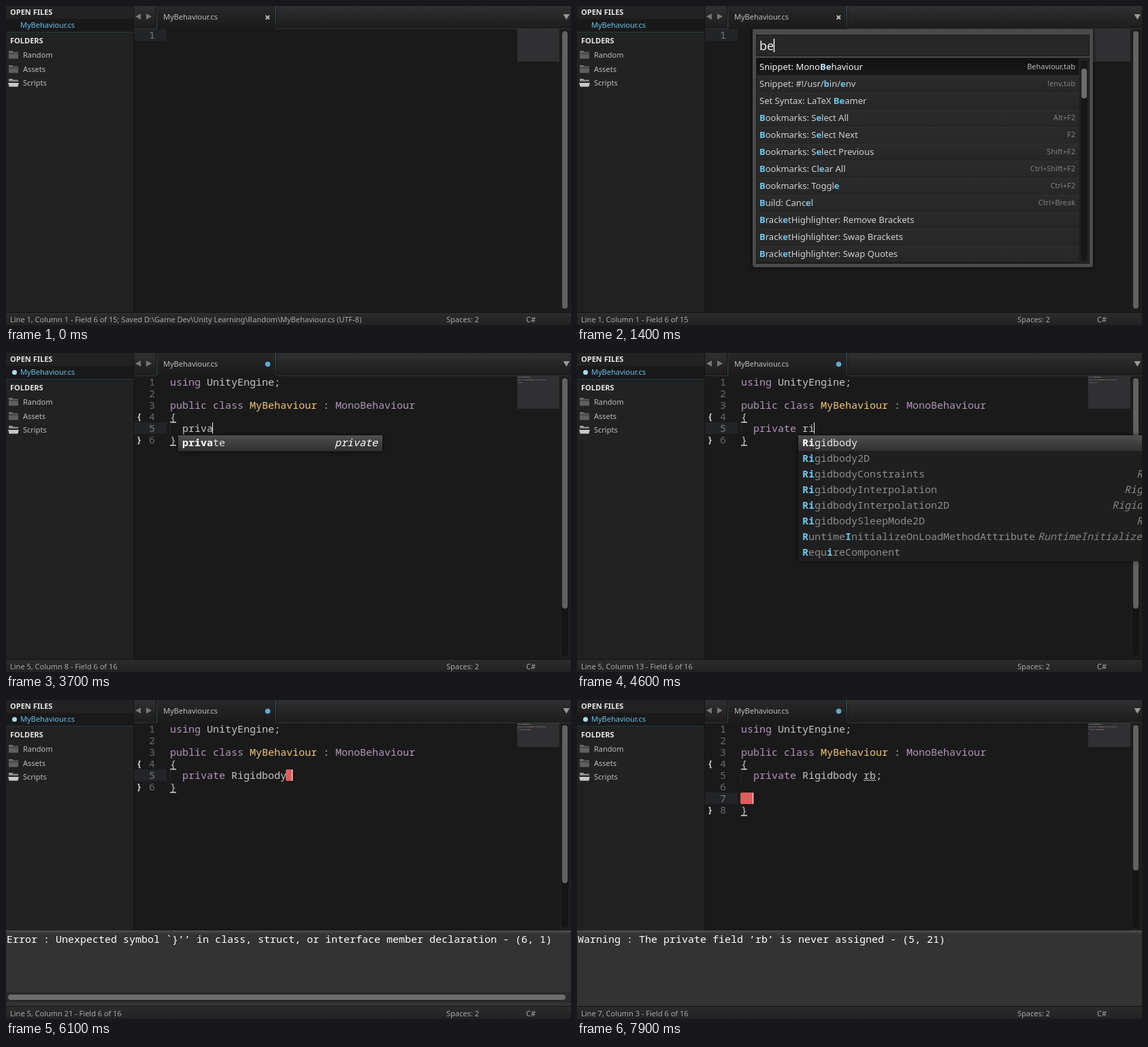
These frames come from a looping animation (830x469 px, 8 s). An HTML page with a canvas:

```html
<!DOCTYPE html>
<html lang="en">
<head>
<meta charset="utf-8">
<title>Editor</title>
<style>
html, body { margin: 0; width: 100%; height: 100%; overflow: hidden; background: #1a1a1a; }
canvas { display: block; }
</style>
</head>
<body>
<canvas id="stage" width="830" height="469"></canvas>
<script>
const g = document.getElementById('stage').getContext('2d');
const LOOP = 8000, ROW = 17, CH = 9, CODE_X = 241, TOP = 34;
const MONO = '"Noto Sans Mono", "DejaVu Sans Mono", monospace';
const SANS = '"Noto Sans", "Open Sans", sans-serif';
const UI = `11px ${SANS}`, CODE = `15px ${MONO}`;
const PURPLE = '#b294bb', YELLOW = '#f0c674', PLAIN = '#c5c8c6', BLUE = '#6cc8f2';

// Text of the line being typed, with the completion query it opens
const typing = [
  [2000, '  '], [3300, '  p'], [3500, '  pri', 'pri'], [3600, '  priv', 'priv'],
  [3700, '  priva', 'priva'], [3800, '  privat', 'privat'], [3900, '  private', 'private'],
  [4000, '  private '], [4400, '  private r', 'r'], [4500, '  private ri', 'ri'],
  [5800, '  private Rigidbody'], [6100, '  private Rigidbody '],
  [6400, '  private Rigidbody r', 'r'], [6700, '  private Rigidbody rb', 'rb'],
  [6900, '  private Rigidbody rb;']
];
const queries = [[0, ''], [1300, 'b'], [1400, 'be'], [1500, 'beh'], [1700, 'beha']];
const blink = [[0, 0], [300, .5], [400, 1], [700, 0], [2000, 1], [2600, .5], [2700, 0], [2900, 1],
  [4900, .5], [5000, 0], [5500, .5], [5600, 1], [7200, 0], [7400, 1]];

const commands = [
  ['Snippet: MonoBehaviour', 'Behaviour,tab'], ['Snippet: #!/usr/bin/env', '!env,tab'],
  ['Set Syntax: LaTeX Beamer'], ['Bookmarks: Select All', 'Alt+F2'], ['Bookmarks: Select Next', 'F2'],
  ['Bookmarks: Select Previous', 'Shift+F2'], ['Bookmarks: Clear All', 'Ctrl+Shift+F2'],
  ['Bookmarks: Toggle', 'Ctrl+F2'], ['Build: Cancel', 'Ctrl+Break'],
  ...['Remove Brackets', 'Swap Brackets', 'Swap Quotes', 'Select Tag Name', 'Select Tag Attributes',
    'Select Bracket Content', 'Fold Bracket Content', 'Jump to Left Bracket', 'Jump to Right Bracket',
    'Show Bracket Debug Info', 'Toggle Global Enable', 'Toggle High Visibility Mode'
  ].map(s => ['BracketHighlighter: ' + s])
];
const rigid = ['', '2D', 'Constraints', 'Interpolation', 'Interpolation2D', 'SleepMode2D'].map(s => 'Rigidbody' + s);

const at = (list, t) => list.filter(e => e[0] <= t).pop();
const clamp = v => Math.max(0, Math.min(1, v));

function rect(x, y, w, h, color, r = 0) {
  g.fillStyle = color;
  g.beginPath();
  g.roundRect(x, y, w, h, r);
  g.fill();
}
function grad(y, h, ...colors) {
  const f = g.createLinearGradient(0, y, 0, y + h);
  colors.forEach((c, i) => f.addColorStop(i / (colors.length - 1), c));
  return f;
}
function text(s, x, y, color, font = UI, align = 'left') {
  g.font = font;
  g.fillStyle = color;
  g.textAlign = align;
  g.fillText(s, x, y);
}
function poly(color, ...p) {
  g.fillStyle = color;
  g.beginPath();
  for (let i = 0; i < p.length; i += 2) g.lineTo(p[i], p[i + 1]);
  g.fill();
}
const dot = (x, y, r, color) => rect(x - r, y - r, 2 * r, 2 * r, color, r);

// Indices of a fuzzy match: adjacent letter first, then a capital, then any; null when absent
function match(s, q) {
  const hits = [];
  let i = 0;
  for (const c of q) {
    if (s[i]?.toLowerCase() !== c) {
      const up = s.indexOf(c.toUpperCase(), i);
      i = up >= 0 ? up : s.indexOf(c, i);
      if (i < 0) return null;
    }
    hits.push(i++);
  }
  return hits;
}
function matched(s, q, x, y, font, base, hit) {
  const hits = match(s, q) || [];
  for (let i = 0; i < s.length;) {
    const on = hits.includes(i);
    let j = i + 1;
    while (j < s.length && hits.includes(j) === on) j++;
    const part = s.slice(i, j);
    text(part, x, y, on ? hit : base, (on ? 'bold ' : '') + font);
    x += g.measureText(part).width;
    i = j;
  }
  return x;
}

function folder(y, open) {
  rect(4, y, 6, 3, open ? '#a5a5a5' : '#777', 1);
  rect(4, y + 1.5, 14, 10, open ? '#8a8a8a' : '#5f5f5f', 1);
  if (open) {
    rect(4, y + 4, 14, 2, '#222');
    poly('#c8c8c8', 3, y + 6, 19, y + 6, 17, y + 11.5, 5, y + 11.5);
  } else rect(4, y + 3.5, 14, 1, '#333');
}

function sidebar(dirty) {
  rect(0, 0, 188, 451, '#222');
  rect(0, 19, 188, 19, '#191919');
  rect(0, 38, 188, 1, '#1f3b44');
  text('OPEN FILES', 6, 13, '#e6e6e6', 'bold ' + UI);
  text('MyBehaviour.cs', 21, 32, '#66c0ea');
  if (dirty) dot(12.5, 28.5, 3.5, '#a8dcf4');
  text('FOLDERS', 6, 55, '#e6e6e6', 'bold ' + UI);
  ['Random', 'Assets', 'Scripts'].forEach((s, i) => {
    const y = 76 + Math.round(i * 20.6);
    folder(y - 10, i === 2);
    text(s, 25, y, '#bdbdbd');
  });
  rect(187, 0, 1, 451, '#141414');
}

function tabs(dirty) {
  rect(188, 0, 642, 34, grad(0, 34, '#303030', '#1c1c1c'));
  rect(188, 33, 642, 1, '#343434');
  rect(221, 0, 176, 34, grad(0, 34, '#282828', '#1a1a1a'));
  rect(220, 0, 1, 33, '#0d0d0d');
  rect(221, 0, 1, 33, grad(0, 33, '#333', '#3c5a66'));
  rect(396, 0, 1, 33, grad(0, 33, '#3c7183', '#333'));
  rect(397, 0, 1, 33, '#0d0d0d');
  poly('#777', 190, 15.5, 198, 11, 198, 20);
  poly('#777', 214, 15.5, 206, 11, 206, 20);
  poly('#999', 818.5, 12, 828, 12, 823.2, 20);
  text('MyBehaviour.cs', 231, 20, '#bdbdbd');
  if (dirty) dot(384.5, 16.5, 3.8, '#62a9d3');
  else {
    g.strokeStyle = '#bdbdbd';
    g.lineWidth = 1.8;
    g.beginPath();
    g.moveTo(381.5, 14); g.lineTo(387, 19.5);
    g.moveTo(387, 14); g.lineTo(381.5, 19.5);
    g.stroke();
  }
}

const tokenColor = w => /^(using|public|class|private|MonoBehaviour)$/.test(w) ? PURPLE
  : w === 'MyBehaviour' ? YELLOW : PLAIN;

function editor(lines, row, caret, bottom, warn) {
  rect(188, TOP, 642, 417, '#1a1a1a');
  const view = bottom - TOP, last = lines.length - 1;
  rect(751, TOP, 62, view / 8.7, '#303032');
  rect(188, TOP + row * ROW, 48, ROW, '#222428');
  lines.forEach((line, i) => {
    const y = TOP + i * ROW;
    text(i + 1, 219, y + 14, i === row ? '#777b7e' : '#666a6d', CODE, 'right');
    if (last && i >= 4 && i < last && line.trim())
      for (let k = 0; k < ROW; k += 2) rect(CODE_X, y + k, 1, 1, '#3c3c3c');
    for (const m of line.matchAll(/\w+|[^\w\s]+/g)) {
      const color = tokenColor(m[0]);
      text(m[0], CODE_X + m.index * CH, y + 14, color, CODE);
      g.globalAlpha = .4;
      rect(751 + m.index * 1.05, TOP + 1 + i * 2, m[0].length * 1.05, 1, color);
      g.globalAlpha = 1;
    }
    if (line === '{' || line === '}') {
      text(line, 192, y + 13, '#e0e0e0', `bold 12px ${MONO}`);
      rect(CODE_X, y + 16, 9, 1.5, '#d8d8d8');
    }
    const space = line.match(/ +$/);
    if (space) {
      const x = CODE_X - 1 + space.index * CH, n = space[0].length;
      rect(x, y, n * CH + 1.5, ROW, '#e25b5b', 2);
      for (let k = 0; k < n; k++) rect(x + k * CH + 5, y + 8, 1.5, 1.5, '#b98080');
    }
  });
  if (warn) {
    g.strokeStyle = '#d0d0d0';
    g.lineWidth = 1;
    g.beginPath();
    for (let k = 0; k <= 9; k++) g.lineTo(421 + k * 2, 117 + k % 2 * 2);
    g.stroke();
  }
  g.globalAlpha = caret;
  rect(CODE_X - 1 + lines[row].length * CH, TOP + row * ROW, 1, ROW, '#e8e8e8');
  g.globalAlpha = 1;
  rect(814, TOP, 16, view, '#1e1e1e');
  rect(816, 36, 10, view - 6, '#151515', 5);
  rect(817, 37, 8, (view - 8) * view / (last * ROW + view), '#626262', 4);
}

function popup(line, q) {
  let items = rigid, right = 841;
  if (q[0] === 'p') items = ['private', 'PrimitiveType', 'ProceduralPropertyDescription'];
  else if (line.includes('Rigidbody')) items = ['RenderBuffer', ...rigid, 'RangeAttribute'];
  else {
    items = [...rigid, 'RuntimeInitializeOnLoadMethodAttribute', 'RequireComponent'];
    right = 1002;
  }
  items = items.filter(s => match(s, q));
  if (items.length === 1) right = 546;
  const x = CODE_X - 1 + (line.length - q.length) * CH - 5, h = items.length * 23, w = right + 7 - x;
  g.save();
  g.shadowColor = '#000a';
  g.shadowBlur = 6;
  rect(x, 121, w, h + 1, '#1f1f1f', 1);
  g.restore();
  g.save();
  g.beginPath();
  g.rect(x, 121, w, h + 2);
  g.clip();
  rect(x, 121, w, 23, grad(121, 23, '#505050', '#303030'));
  items.forEach((s, i) => {
    const y = 137 + i * 23, font = (i ? '' : '500 ') + CODE;
    const end = matched(s, q, x + 6, y, CODE, i ? '#8c8c8c' : '#e8e8e8', i ? BLUE : '#fff');
    text(s, Math.max(right - s.length * CH, end + 4), y, i ? '#858585' : '#fff', 'italic ' + font);
  });
  g.restore();
}

function palette(q, open) {
  g.save();
  g.beginPath();
  g.rect(240, TOP, 540, 420);
  g.clip();
  g.translate(0, (open - 1) * 350);
  g.save();
  g.shadowColor = '#000c';
  g.shadowBlur = 6;
  rect(258, 30, 500, 354, '#4b4b4b', 4);
  g.restore();
  rect(263, 42, 490, 32, '#1c1c1c');
  rect(264, 43, 488, 30, '#272727');
  text(q, 268, 65, '#eee', `18px ${SANS}`);
  rect(267.5 + g.measureText(q).width, 48, 1.5, 20, '#f0f0f0');
  rect(263, 76, 490, 303, '#1d1d1d');
  commands.filter(c => match(c[0], q)).slice(0, 12).forEach(([s, key], i) => {
    const y = 77 + i * 25;
    rect(264, y, 473, 25, i ? grad(y, 25, '#2b2b2b', '#272727') : grad(y, 25, '#111', '#191919'));
    if (i) {
      rect(264, y, 473, 1, '#2f2f2f');
      rect(264, y + 24, 473, 1, '#212121');
    }
    matched(s, q, 268, y + 17, `13px ${SANS}`, i ? '#d0d0d0' : '#f4f4f4', i ? BLUE : '#c4e9fb');
    if (key) text(key, 732, y + 16, i ? '#808080' : '#bbb', UI, 'right');
  });
  rect(737, 77, 15, 301, '#222');
  rect(740, 80, 10, 295, '#181818', 5);
  rect(741, 92, 8, q ? 44 : 24, '#6c6c6c', 4);
  g.restore();
}

function panel(y, warn) {
  rect(0, y, 830, 451 - y, '#333');
  rect(0, y, 830, 1, '#5a5a5a');
  rect(0, y + 1, 830, 5, grad(y + 1, 5, '#444', '#333'));
  text(warn ? "Warning : The private field ’rb’ is never assigned - (5, 21)"
    : "Error : Unexpected symbol `}’’ in class, struct, or interface member declaration - (6, 1)",
    1, y + 18, '#fff', '500 ' + CODE);
  if (!warn) {
    rect(0, 429, 830, 16, '#2b2b2b');
    rect(2, 432, 821, 10, '#1f1f1f', 5);
    rect(3, 433, 819, 8, '#6c6c6c', 4);
  }
}

function status(t, row, col) {
  rect(0, 450, 830, 19, grad(451, 18, '#2c2c2c', '#222'));
  rect(0, 450, 830, 1, '#111');
  const saved = t < 700 ? '; Saved D:\\Game Dev\\Unity Learning\\Random\\MyBehaviour.cs (UTF-8)' : '';
  text(`Line ${row + 1}, Column ${col + 1} - Field 6 of ${t < 2000 ? 15 : 16}${saved}`, 6, 465, '#a8a8a8');
  text('Spaces: 2', 647, 465, '#a8a8a8');
  text('C#', 764, 465, '#a8a8a8');
}

function draw(t) {
  const dirty = t >= 2000, warn = t >= 7400;
  let lines = [''], row = 0, query;
  if (dirty) {
    const [, line, q] = at(typing, t);
    const tail = t >= 7800 ? ['', '  '] : warn ? ['  '] : [];
    lines = ['using UnityEngine;', '', 'public class MyBehaviour : MonoBehaviour', '{', line, ...tail, '}'];
    row = 4 + tail.length;
    query = q;
  }
  const shown = 1 - (1 - clamp((t - 4800) / 300)) ** 2;
  const bottom = 450 - 111 * shown;
  const open = t < 2000 ? 1 - (1 - clamp((t - 600) / 400)) ** 2 : clamp((2300 - t) / 400);

  sidebar(dirty);
  editor(lines, row, at(blink, t)[1], bottom, warn);
  tabs(dirty);
  if (shown) panel(bottom, warn);
  if (query) popup(lines[row], query);
  if (open) palette(at(queries, t)[1], open);
  status(t, row, lines[row].length);
}

const start = performance.now();
function tick() {
  const t = (performance.now() - start) % LOOP;
  draw(Math.floor(t / 100) * 100);
  requestAnimationFrame(tick);
}
tick();
</script>
</body>
</html>
```
